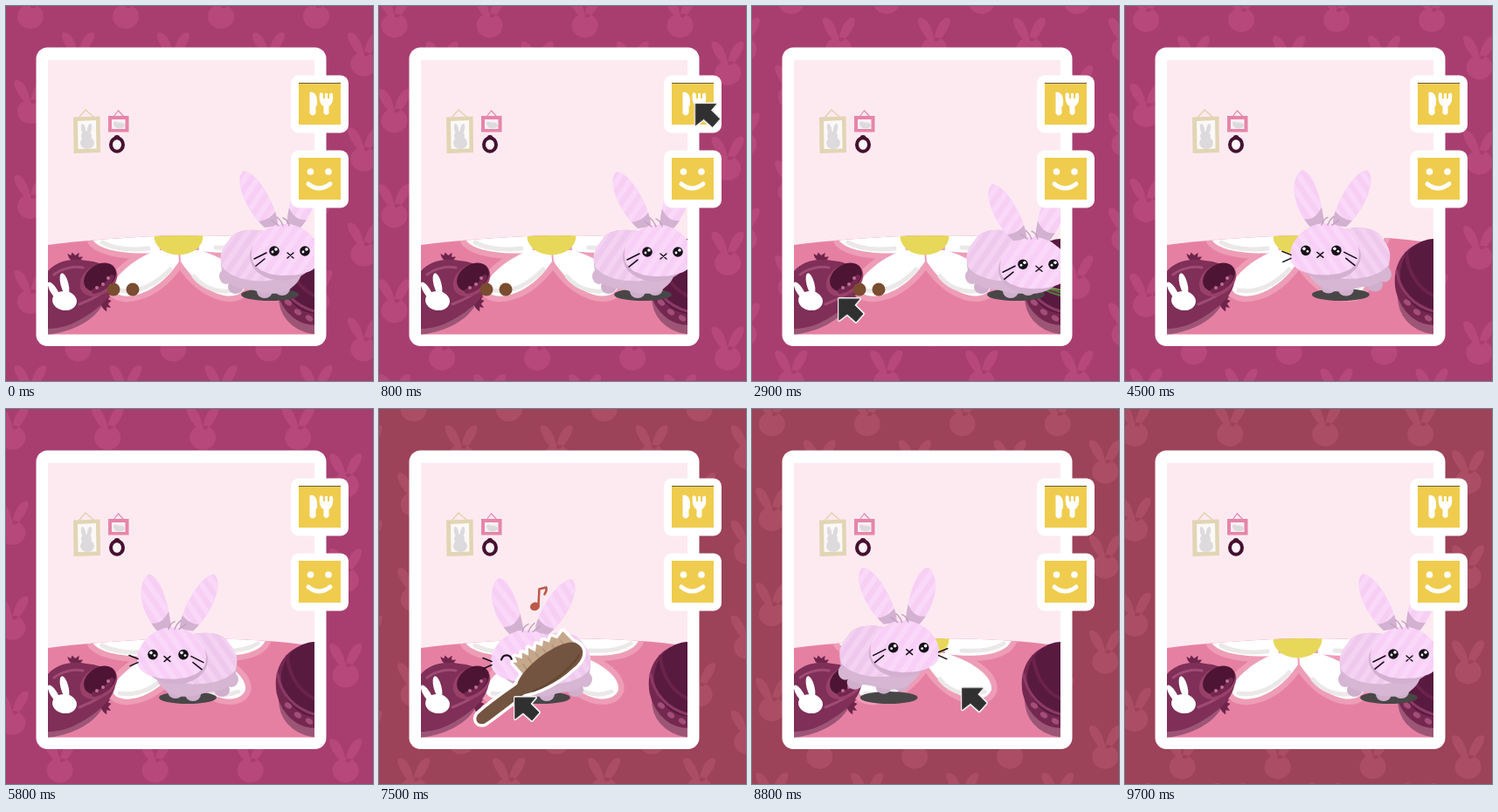
Recreate the animation shown at these times as an HTML page with a canvas. Size 420x430 px, loop 9.8 s.

```html
<!DOCTYPE html>
<html lang="en">
<head>
<meta charset="utf-8">
<title>Bunny room</title>
<style>
html, body { margin: 0; width: 100%; height: 100%; overflow: hidden; background: #a83e70; }
canvas { display: block; width: 420px; height: 430px; }
</style>
</head>
<body>
<canvas id="stage" width="420" height="430"></canvas>
<script>
const ctx = document.getElementById('stage').getContext('2d');
const LOOP = 9800;
const TAU = Math.PI * 2;

const clamp = v => Math.max(0, Math.min(1, v));
const smooth = v => { v = clamp(v); return v * v * (3 - 2 * v); };
const mix = (a, b, k) => a + (b - a) * k;
const ramp = (t, from, to) => smooth((t - from) / (to - from));
const blend = (a, b, k) => `rgb(${a.map((v, i) => Math.round(mix(v, b[i], k))).join()})`;

// Eased position on a list of [time, x, y] stops.
function track(stops, t) {
  let i = 0;
  while (i < stops.length - 2 && t > stops[i + 1][0]) i++;
  const [t0, x0, y0] = stops[i], [t1, x1, y1] = stops[i + 1];
  const k = ramp(t, t0, t1);
  return [mix(x0, x1, k), mix(y0, y1, k)];
}

function group(x, y, draw, angle = 0, sx = 1, sy = 1) {
  ctx.save();
  ctx.translate(x, y);
  ctx.rotate(angle);
  ctx.scale(sx, sy);
  draw();
  ctx.restore();
}

function fill(path, color) {
  ctx.fillStyle = color;
  ctx.fill(path);
}

function line(path, color, width) {
  ctx.strokeStyle = color;
  ctx.lineWidth = width;
  ctx.stroke(path);
}

function clipped(path, draw) {
  ctx.save();
  ctx.clip(path);
  draw();
  ctx.restore();
}

function oval(x, y, rx, ry = rx, angle = 0) {
  const p = new Path2D();
  p.ellipse(x, y, rx, ry, angle, 0, TAU);
  return p;
}

function box(x, y, w, h, r = 0) {
  const p = new Path2D();
  p.roundRect(x, y, w, h, r);
  return p;
}

const shape = d => new Path2D(d);

// Background

const tile = new Path2D();
tile.addPath(oval(0, 0, 15, 14));
tile.addPath(shape('M-3-9C-11-12-24-36-16-36C-8-37-1-22 0-10Z'));
tile.addPath(shape('M3-9C11-12 24-36 16-36C8-37 1-22 0-10Z'));

function drawBackground(t) {
  const k = ramp(t, 6500, 6900);
  ctx.fillStyle = blend([168, 62, 112], [156, 66, 89], k);
  ctx.fillRect(0, 0, 420, 430);
  const color = blend([183, 72, 123], [171, 78, 101], k);
  const step = 54.5, shift = (t / 4200 * step) % (2 * step);
  for (let row = -4; row < 10; row++) {
    for (let col = -2; col < 11; col++) {
      if ((row + col) % 2) continue;
      group(28 + col * step - shift, 12 + row * step + shift, () => fill(tile, color));
    }
  }
}

// Room

function drawPictures() {
  line(shape('M84 127L91 119L100 127'), '#e2d3b0', 1.5);
  fill(shape('M77 127.500L107.500 126.500L108 168L77.500 169Z'), '#e2d5b5');
  fill(shape('M82 132L103 131L103.500 163.500L82.500 164Z'), '#fbf8f6');
  fill(oval(93, 157, 8, 7), '#dcdadd');
  fill(oval(92, 149, 6, 5.500), '#dcdadd');
  fill(oval(88.500, 141, 2.500, 6, -.2), '#dcdadd');
  fill(oval(95.500, 141, 2.500, 6, .2), '#dcdadd');
  line(shape('M123 127L128.500 120L135 127'), '#e48aac', 1.2);
  fill(box(117, 126, 23.500, 18.500), '#e685aa');
  fill(box(121, 130, 15.500, 11), '#fbeff3');
  fill(oval(130, 137, 6, 3.500), '#dcdadd');
  fill(oval(125.500, 135, 2.500), '#dcdadd');
  fill(oval(127, 150, 3, 2), '#461030');
  fill(oval(127, 159, 6, 6.500), '#fbf4f6');
  line(oval(127, 159, 7, 7.800), '#461030', 4);
}

const petals = [
  shape('M97 262C98 277 126 286 176 283L175 262Z'),
  shape('M220 262L221 281C262 286 294 281 298 262Z'),
  shape('M174 280C152 286 121 310 122 324C127 340 170 336 198 293L197 280Z'),
  shape('M221 280C250 288 276 306 274 322C267 341 228 336 200 293L199 280Z')
];

function drawRug() {
  const floor = shape('M48 274Q110 266 197 263Q300 263 353 272V377H48Z');
  fill(floor, '#e680a3');
  clipped(floor, () => {
    ctx.lineJoin = ctx.lineCap = 'round';
    petals.forEach(p => line(p, '#ee9db7', 13));
    petals.forEach(p => fill(p, '#ffffff'));
    line(shape('M130 326C152 330 173 318 188 302M215 310C228 326 250 331 266 324M110 271C124 279 145 280 163 278M240 277Q272 279 288 269'), '#ebe8e8', 5);
    fill(oval(197.500, 264, 28, 21.500), '#e7d85a');
  });
}

function drawBag() {
  fill(shape('M48 345L112 340C102 360 78 373 48 377Z'), '#9d5576');
  const tassel = shape('M0 0C-5-2-8-5-9-9L-5-7L-4-11L0-8L4-12L4-7L9-8C7-3 4 0 0 0Z');
  group(78, 294, () => fill(tassel, '#6f254b'), .15);
  group(109, 340, () => fill(tassel, '#6f254b'), 1.75);
  fill(shape('M48 304C57 293 74 288 92 292C114 294 128 304 125 318C121 335 104 349 84 360C70 368 57 370 48 370Z'), '#7f2f58');
  line(shape('M55 308C64 301 77 298 88 300M84 342Q97 337 107 331'), '#a04b74', 3);
  fill(oval(106, 314, 23, 17, -.6), '#994069');
  fill(oval(107.500, 311, 20, 14.500, -.6), '#4d1533');
  line(shape('M101 327Q115 324 121 311'), '#742750', 6);
  [[104, 323], [111, 319], [117, 312]].forEach(([x, y]) => fill(oval(x, y, 2), '#bd6f93'));
  fill(oval(67, 338, 14, 11, .15), '#ffffff');
  fill(oval(55, 327, 4, 12, -.55), '#ffffff');
  fill(oval(67, 319, 4.500, 13, -.25), '#ffffff');
}

function drawBasket() {
  fill(oval(354, 338, 42, 38, .3), '#9d5576');
  fill(oval(350, 318, 41, 48, -.2), '#742850');
  fill(oval(355, 310, 40, 43, -.2), '#591a40');
  line(shape('M311 304C314 327 331 344 353 350'), '#8d3a66', 3);
  line(shape('M322 284C324 307 337 325 353 332'), '#6b234b', 4);
  [[323, 340], [334, 351], [347, 358]].forEach(([x, y]) => fill(oval(x, y, 4.500, 3, .6), '#a24e79'));
}

function drawDroppings(t) {
  [[123, 3300], [145, 3600]].forEach(([x, gone]) => {
    if (t < gone) fill(oval(x, 325, 7.500), '#7a4c30');
  });
}

// Bunny: local origin is the head centre, facing left.

function fur(path, base, stripe) {
  fill(path, base);
  const stripes = new Path2D();
  for (let x = -190; x < 130; x += 15) {
    stripes.moveTo(x, -100);
    stripes.lineTo(x + 110, 60);
  }
  clipped(path, () => line(stripes, stripe, 6));
}

const earFront = shape('M-15-25C-33-42-44-78-27-92C-14-92-4-60-1-30Z');
const earBack = shape('M9-29C8-46 30-90 48-92C60-84 47-47 24-27Z');
const head = shape('M0-31C19-32 38-16 39 2C40 20 22 28 0 28C-23 28-41 21-40 4C-38-15-19-31 0-31Z');
const body = shape('M-10-8C18-30 58-30 65-13C74-4 78 20 68 31C62 43 44 42 36 44C20 50 0 49-8 40C-22 30-24 8-10-8Z');
const back = shape('M-10-8C18-30 58-30 65-13C74-4 77 8 72 18C58 36 10 40-14 20Z');

function shadedEar(path, shade) {
  fur(path, '#f7cff5', '#fad8f9');
  clipped(path, () => fill(shade, '#d3b1d0'));
}

function drawFace(happy) {
  ctx.lineCap = 'round';
  const ink = '#17101a';
  [-22, 13].forEach(x => {
    if (happy) {
      line(shape(`M${x - 6} 3C${x - 4}-4 ${x + 4}-4 ${x + 6} 3`), ink, 2.2);
    } else {
      fill(oval(x, 0, 5.800), ink);
      fill(oval(x - 2, -2, 1.800), '#ffffff');
      fill(oval(x + 2, 1, 1.400), '#ffffff');
    }
  });
  line(shape('M-9 2L-2 8M-2 2L-9 8'), ink, 1.4);
  line(shape('M22 2L36 9M24 9L34 17M-39 5L-49 1M-39 9L-48 13'), ink, 1.6);
}

function drawBunny(t) {
  const [x] = track([[3800, 320], [4900, 190], [6400, 190], [6900, 168], [8700, 168], [9500, 320]].map(s => [...s, 0]), t);
  const moving = (t > 3800 && t < 4900) || (t > 8700 && t < 9500);
  const start = t < 5000 ? 3800 : 8700, span = t < 5000 ? 1100 : 800;
  const hop = moving ? Math.abs(Math.sin((t - start) / span * Math.PI * 3)) * 9 : 0;
  const facing = t > 3850 && t < 8700 ? 1 : -1;
  const brushed = t > 6900 && t < 8650;
  const eating = ramp(t, 2050, 2300) * (1 - ramp(t, 3350, 3600));
  const munch = eating * Math.sin((t - 2900) / 200 * Math.PI) * 2;
  const bob = Math.sin(t / 1600 * Math.PI - Math.PI / 2) + (brushed ? 2 : 0);

  group(x, 282, () => {
    fill(oval(18, 49, 33, 7), '#494647');
    ctx.translate(0, -hop);
    [[4, 42], [24, 45], [57, 40]].forEach(([fx, fy]) => fill(oval(fx, fy, 9, 8), '#cfafcc'));
    fill(oval(68, 28, 8, 9), '#d6b6d3');
    fill(body, '#d6b6d3');
    fur(back, '#efc9ed', '#f4d2f2');

    ctx.translate(-3 * eating, bob + 15 * eating + munch);
    fill(oval(4, 6, 37, 28), '#d3b0d0');
    const spread = brushed ? .05 : 0;
    group(0, 0, () => shadedEar(earBack, shape('M5-26L9-50Q16-36 31-34L22-22Z')), spread);
    group(0, 0, () => shadedEar(earFront, shape('M-24-36Q-10-34-3-52L3-28L-15-22Z')), -spread);
    fur(head, '#f8cff6', '#fad8f9');
    line(shape('M-4-29Q-3-35 3-38M3-29Q5-35 10-39M8-29L16-35'), '#c3a0c0', 1.4);
    drawFace(brushed);
  }, 0, facing);
}

// Items

function drawCarrot(t) {
  if (t < 1250 || t > 3550) return;
  const fallen = clamp((t - 1250) / 680);
  const y = 108 + 219 * fallen * fallen;
  const angle = -.6 + .45 * clamp((t - 1700) / 230);
  const scale = 1 - ramp(t, 3200, 3550);
  group(299 + 12 * fallen, y, () => {
    ctx.lineCap = 'round';
    line(shape('M21-1Q28-8 35-8M21 0Q34 2 50 13M21 0Q32 8 45 13'), '#527f3e', 2);
    line(shape('M21 0Q34 0 48 8'), '#88a553', 1.5);
    fill(shape('M-25 3C-18-5 8-11 18-8C25-3 23 6 15 9C1 11-19 9-25 3Z'), '#df6439');
    line(shape('M-11-1L-8 4M0-5L3 1M11-6L13 0'), '#f6c3a3', 1.6);
  }, angle, scale, scale);
}

function drawNote(t) {
  if (t < 7000 || t > 8650) return;
  const second = t > 7800;
  const age = (t - (second ? 7800 : 7000)) / 800;
  const x = second ? 160 : 182;
  group(x + Math.sin((age - .6) * 5) * 3, 231 - age * 20, () => {
    ctx.globalAlpha = clamp((1 - age) * 5);
    ctx.lineJoin = 'round';
    fill(oval(-4, 8, 5.500, 4.800, -.3), '#bd5948');
    line(shape('M0 8L1-12L9-14Q10-10 7-6'), '#bd5948', 2.5);
  }, second ? .05 : 0);
}

const brushBack = shape('M3-6C20-8 43-7 60-7C77-20 130-20 142-6C149 6 139 16 122 16C98 19 75 14 60 7C44 6 21 8 3 7C-4 4-4-3 3-6Z');
const bristles = shape('M73-8L71-30L75-27L77-34L82-27L86-33L90-26L95-33L99-25L105-31L109-25L114-30L118-24L124-28L128-22L138-25L141-5Z');

function drawBrush() {
  ctx.lineJoin = 'round';
  [brushBack, bristles].forEach(p => line(p, '#ffffff', 7));
  fill(bristles, '#c5a88c');
  line(shape('M79-12V-22M88-12V-24M98-13V-23M108-13V-22M119-12V-20M130-10V-18'), '#b3937a', 1.5);
  fill(brushBack, '#735440');
  line(shape('M70 10C91 16 119 15 137 8'), '#644733', 2);
}

const arrow = shape('M1 1H24L18 8L28 18L20 27L10 18L1 25Z');

const pointer = [
  [450, 430, 150], [900, 352, 106], [1150, 352, 106], [1600, 212, 187],
  [2250, 140, 300], [2900, 99, 335], [3250, 118, 322], [3600, 140, 322],
  [4500, 430, 240], [5900, 430, 240], [6300, 354, 194], [6500, 354, 194],
  [6900, 194, 340], [7200, 205, 346], [7500, 155, 330], [7800, 150, 328],
  [8100, 194, 346], [8350, 160, 332], [8600, 190, 344], [9300, 440, 220]
];

function drawPointer(t) {
  const [x, y] = track(pointer, Math.max(450, t));
  const sway = (x - 155) / 40;
  group(x, y, () => {
    if (t > 6600 && t < 8700) group(-41 + 6 * sway, 27, drawBrush, -.635 + .03 * sway);
    ctx.lineJoin = 'round';
    line(arrow, '#f2eff0', 4);
    fill(arrow, '#303030');
    line(arrow, '#404040', 1);
  });
}

function drawButtons() {
  [79, 165].forEach(y => {
    fill(box(326, y + .5, 66, 66, 9), '#ffffff');
    fill(box(335, y + 9, 48, 48), '#efcc4d');
  });
  fill(box(335, 88, 48, 1), '#685c3d');
  fill(shape('M347.500 99C354 97 357 104 356 114L354.500 115V123Q351 128 347.500 123Z'), '#ffffff');
  fill(shape('M359 100Q361 98 363 101V106H365V100H368V106H370V101Q373 98 374 101C375 109 373 113 369.500 115V123Q367 127 363.500 123V115C359 113 358 106 359 100Z'), '#ffffff');
  [348.5, 369].forEach(x => fill(oval(x, 190, 3.800), '#ffffff'));
  ctx.lineCap = 'round';
  line(shape('M346 204Q358 214 371 204'), '#ffffff', 5);
}

function render(t) {
  drawBackground(t);
  fill(box(34.5, 47.5, 332, 342.5, 13), '#ffffff');
  clipped(box(48, 62, 305, 314.5), () => {
    ctx.fillStyle = '#fdeaf0';
    ctx.fillRect(48, 62, 305, 315);
    drawPictures();
    drawRug();
    drawBag();
    drawBasket();
    drawDroppings(t);
    drawCarrot(t);
    drawBunny(t);
    drawNote(t);
  });
  drawButtons();
  drawPointer(t);
}

const began = performance.now();
function tick() {
  render((performance.now() - began) % LOOP);
  requestAnimationFrame(tick);
}
tick();
</script>
</body>
</html>
```
